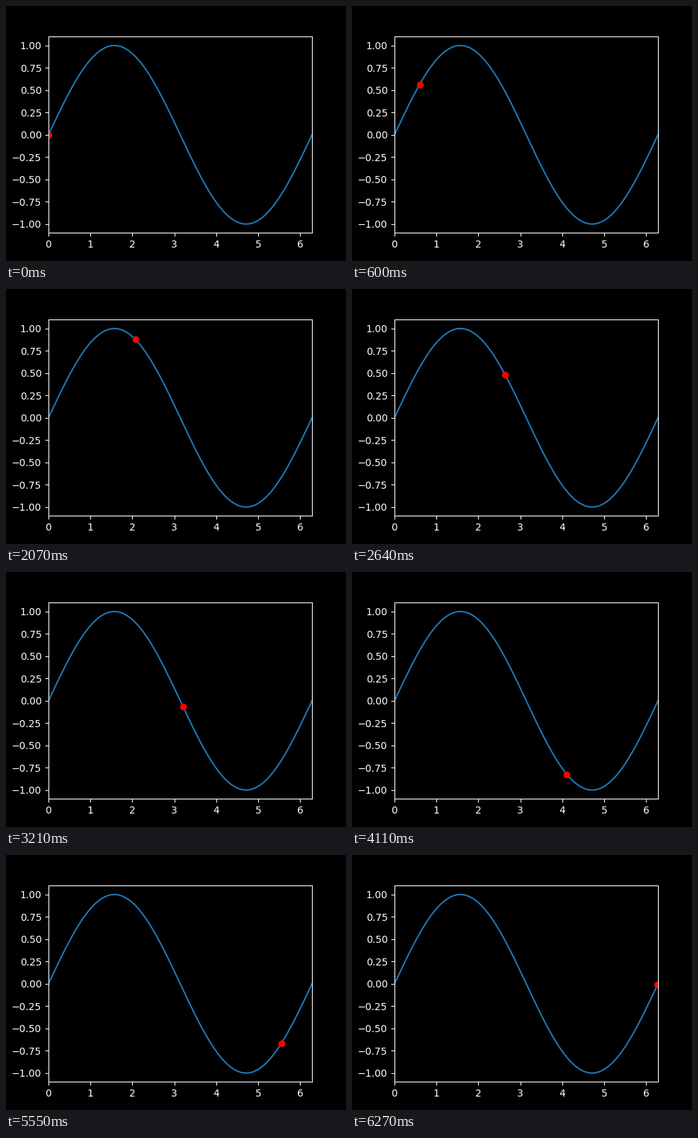
Animation of 480 by 360 pixels, one loop 6.3 s. Source, as a matplotlib script:

```python
import numpy as np
import matplotlib.pyplot as plt
from matplotlib.animation import FuncAnimation

STEP = 0.03       # radians per frame
FRAMES = 210
INTERVAL = 30     # ms

plt.style.use("dark_background")
fig, ax = plt.subplots(figsize=(4.8, 3.6), dpi=100)

x = np.linspace(0, 2 * np.pi, 200)
ax.plot(x, np.sin(x), color="#1f77b4")
dot, = ax.plot([0], [0], "o", color="red")
ax.set_xlim(0, 2 * np.pi)
ax.set_ylim(-1.1, 1.1)


def update(i):
    t = i * STEP
    dot.set_data([t], [np.sin(t)])
    return dot,


anim = FuncAnimation(fig, update, frames=FRAMES, interval=INTERVAL,
                     blit=True, repeat=True, repeat_delay=0)
plt.show()
```
